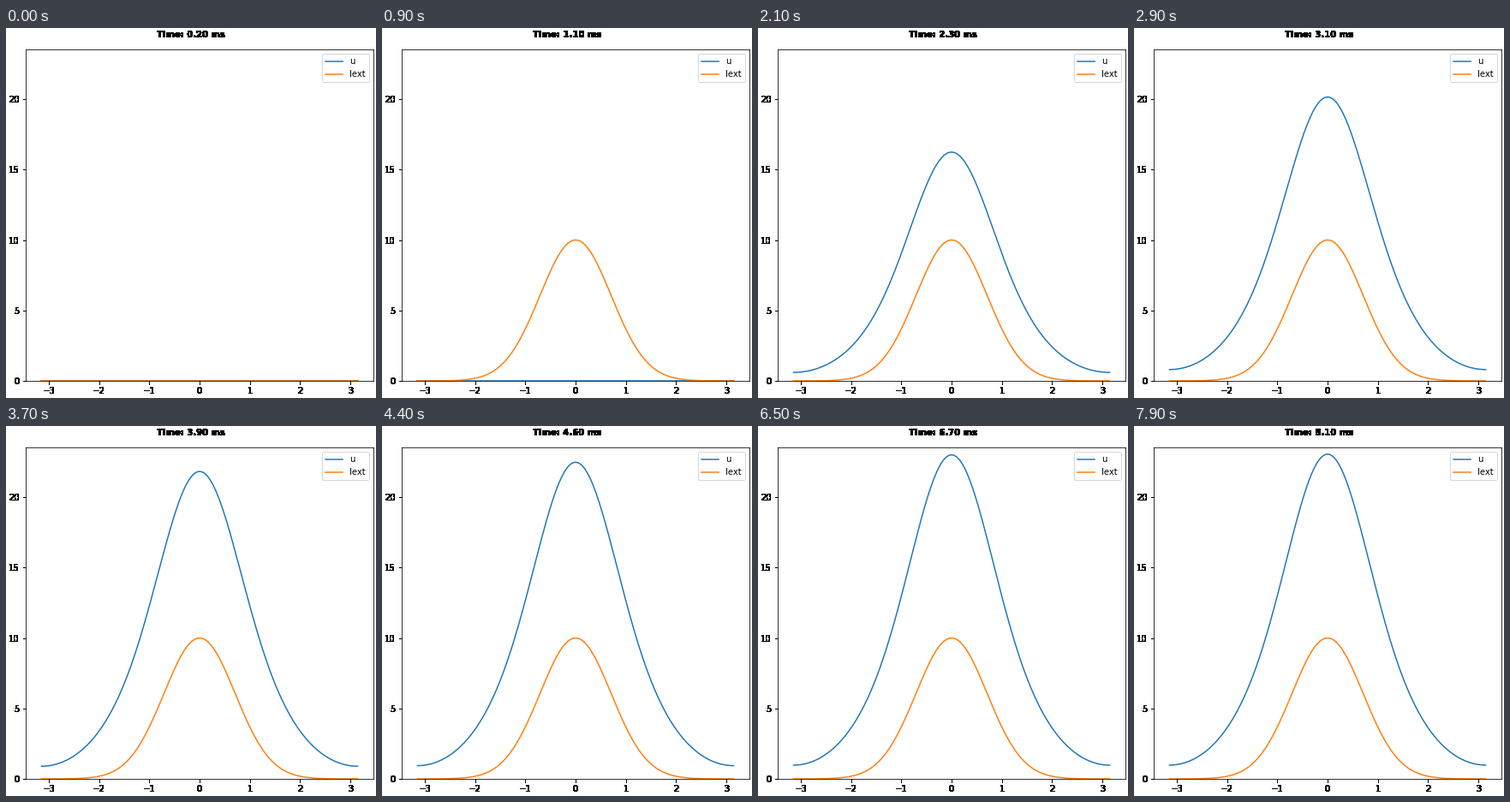
Animation, 432 px wide and 432 px high, one loop 8000 ms. Source, as a matplotlib script:

```python
import matplotlib.pyplot as plt
import numpy as np
from matplotlib.animation import FuncAnimation

SIZE, DPI = 432, 72
FRAMES, STEP_MS = 80, 100
DT, T0 = 0.1, 0.2      # simulated time per frame and at the start
ONSET = 9              # frame at which the stimulus switches on
N, J0, K, AMP = 512, 4.0, 0.1, 10.0

x = np.linspace(-np.pi, np.pi, N)


def ring_dist(d):
    d = np.remainder(d, 2 * np.pi)
    return np.minimum(d, 2 * np.pi - d)


kernel = J0 * np.exp(-0.5 * ring_dist(x - x[:, None]) ** 2) / np.sqrt(2 * np.pi)
bump = AMP * np.exp(-x ** 2)


def simulate():
    """Euler steps of a ring network with divisive normalisation."""
    u = np.zeros(N)
    states = []
    for i in range(FRAMES):
        states.append((u, bump if i >= ONSET else np.zeros(N)))
        rate = u ** 2 / (1 + K * np.sum(u ** 2))
        u = u + DT * (-u + kernel @ rate + states[-1][1])
    return states


def harden(img, dpi):
    """Turn every touched pixel solid black, without antialiasing."""
    out = np.zeros_like(img)
    out[..., 3] = img[..., 3] > 0
    return out, 0, 0


states = simulate()

fig = plt.figure(figsize=(SIZE / DPI, SIZE / DPI), dpi=DPI, facecolor="white")
ax = fig.add_axes([23 / SIZE, 20 / SIZE, 406 / SIZE, 387 / SIZE])
ax.set_xlim(-1.1 * np.pi, 1.1 * np.pi)
ax.set_ylim(0, 23.53)
ax.set_xticks(range(-3, 4))
ax.set_yticks(range(0, 21, 5))

line_u, = ax.plot(x, states[0][0], label="u")
line_i, = ax.plot(x, states[0][1], label="Iext")
ax.legend(loc="upper right")

title = fig.text(0.5, 1 - 3 / SIZE, "", fontsize=10, fontweight="bold",
                 ha="center", va="top")
title.set_agg_filter(harden)
for axis in (ax.xaxis, ax.yaxis):
    for tick in axis.get_major_ticks():
        tick.label1.set_agg_filter(harden)
        tick.tick1line.set_agg_filter(harden)


def update(i):
    u, ext = states[i]
    line_u.set_ydata(u)
    line_i.set_ydata(ext)
    title.set_text(f"Time: {T0 + DT * i:.2f} ms")
    return line_u, line_i, title


anim = FuncAnimation(fig, update, frames=FRAMES, interval=STEP_MS,
                     repeat=True, repeat_delay=0, blit=False)
plt.show()
```
